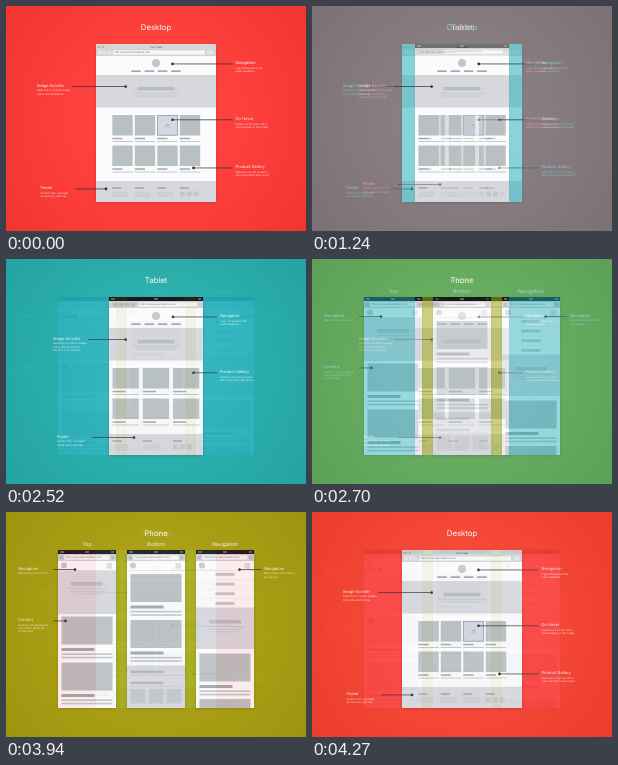
Recreate the animation shown at these times as an HTML page with a canvas. Size 300 px wide and 225 px high, loop 4300 ms.

```html
<!DOCTYPE html>
<html lang="en">
<head>
<meta charset="utf-8">
<title>Responsive wireframes</title>
<style>
html, body { margin: 0; width: 100%; height: 100%; overflow: hidden; }
canvas { display: block; width: 300px; height: 225px; }
</style>
</head>
<body>
<canvas id="stage" width="300" height="225"></canvas>
<script>
const W = 300, H = 225;
const PANEL = '#d7d8de', IMAGE = '#b9c0c3', DARK = '#a4a9ad', PALE = '#c3c7cb', INK = '#2c2c30';
const URL_TEXT = 'http://www.websitedemo.com';
let c;

function rect(x, y, w, h, color) {
  c.fillStyle = color;
  c.fillRect(x, y, w, h);
}

function circle(x, y, r, color) {
  c.fillStyle = color;
  c.beginPath();
  c.arc(x, y, r, 0, Math.PI * 2);
  c.fill();
}

function text(str, x, y, size, color = '#fff', align = 'left') {
  c.font = `${size}px Inter, sans-serif`;
  c.textRendering = 'geometricPrecision';
  c.textAlign = align;
  c.textBaseline = 'middle';
  c.fillStyle = color;
  c.fillText(str, x, y);
}

const centered = (x, y, w, h, color) => rect(x - w / 2, y, w, h, color);

function backdrop(inner, outer) {
  const g = c.createRadialGradient(150, 112, 50, 150, 112, 190);
  g.addColorStop(0, inner);
  g.addColorStop(1, outer);
  rect(0, 0, W, H, g);
}

// Label with a leader line towards a dot on the page
function note(x, y, title, lines, dotX) {
  text(title, x, y - 0.3, 4);
  lines.forEach((s, i) => text(s, x, y + 4.6 + i * 3.4, 2.55, 'rgba(255,255,255,.88)'));
  const lineX = dotX > x ? x + 35 : x - 3;
  rect(Math.min(lineX, dotX), y + 0.3, Math.abs(dotX - lineX), 0.7, INK);
  circle(dotX, y + 0.6, 1.3, INK);
}

function page(x, w) {
  c.save();
  c.shadowColor = 'rgba(0,0,0,.2)';
  c.shadowBlur = 3;
  c.shadowOffsetY = 0.5;
  rect(x, 38, w, 158, '#fbfbfc');
  c.restore();
}

function addressBar(x, w, fieldX, fieldW, y = 42) {
  rect(x, y, w, 7, '#d0d2d4');
  rect(fieldX, y + 1.3, fieldW, 4.4, '#f7f7f8');
  text(URL_TEXT, fieldX + 1.5, y + 3.6, 2.5, '#686c70');
}

function statusBar(x, w) {
  rect(x, 38, w, 4, '#17191b');
  rect(x + 2, 39.5, 4, 1, '#aaa');
  centered(x + w / 2, 39.5, 4, 1, '#aaa');
  rect(x + w - 5, 39.5, 3, 1, '#aaa');
}

function hero(x, y, w, h, barY, barW) {
  rect(x, y, w, h, PANEL);
  const mid = x + w / 2;
  centered(mid, barY, barW, 3.6, '#b9bdc3');
  centered(mid, barY + 6, barW * 1.25, 1, PALE);
  centered(mid, barY + 8.7, barW * 1.1, 1, PALE);
}

function pageTop(x, w) {
  circle(150, 57, 4, PALE);
  [130, 143.3, 156.6, 170].forEach(n => centered(n, 64.3, 9.5, 1.7, DARK));
  hero(x, 69, w, 32.5, 80.8, 37);
}

function pageFooter(x, w, columns) {
  rect(x, 175, w, 21, PANEL);
  columns.forEach((n, i) => {
    rect(n, 181.2, 9, 1.6, DARK);
    if (i < columns.length - 1) {
      for (let y = 185.7; y < 191; y += 2.1) rect(n, y, 16, 0.9, PALE);
    } else {
      for (let k = 0; k < 3; k++) rect(n + k * 7, 185.5, 5, 5, PALE);
    }
  });
}

function product(x, y, w, h) {
  rect(x, y, w, h, IMAGE);
  rect(x, y + h + 2.3, w * 0.5, 1.5, DARK);
  rect(x, y + h + 5.5, w, 1, PALE);
}

function desktop() {
  backdrop('#ff443f', '#f33430');
  text('Desktop', 150, 21.5, 7.8, '#fff', 'center');
  page(90, 120);
  rect(90, 38, 120, 5, '#d6d7d7');
  [92.5, 95, 97.5].forEach((x, i) => circle(x, 41, 0.8, ['#d8605a', '#d8b052', '#76af62'][i]));
  text('Your Page', 150, 41, 2.5, '#55595d', 'center');
  addressBar(90, 120, 107, 92, 43);
  [92, 96.7, 101.4].forEach(x => rect(x, 44.4, 3.9, 4.2, '#e3e4e5'));
  rect(201, 44.4, 7, 4.2, '#e3e4e5');
  pageTop(90, 120);
  const columns = [106.3, 128.8, 151.3, 173.8];
  for (const y of [109, 139.5]) columns.forEach(x => product(x, y, 20.4, 20.5));
  rect(151.3, 109, 20.4, 20.5, '#8d94a7');
  rect(152, 109.7, 19, 19.1, '#d4d8e3');
  centered(161.5, 118.4, 4, 0.8, '#8d94a7');
  centered(161.5, 120.6, 6, 0.8, '#b1b7c4');
  pageFooter(90, 120, columns);
  note(229.5, 57.3, 'Navigation', ['Logo sitting above the', 'main navigation'], 166.5);
  note(31, 80, 'Image Scroller', ['Selection of content images', 'with a title and full link'], 119.7);
  note(229.5, 113.2, 'On Hover', ['Fades to a tint color with a', 'quick overlay on the image'], 166.5);
  note(229.5, 161.3, 'Product Gallery', ['Selection of main products', 'with small title & description'], 187.5);
  note(34.5, 182.3, 'Footer', ['Contact info, copyright,', 'social icons, site map'], 100);
}

function tablet() {
  backdrop('#27b4be', '#18a4b0');
  text('Tablet', 150, 21.5, 7.8, '#fff', 'center');
  page(103, 94);
  statusBar(103, 94);
  addressBar(103, 94, 133, 58);
  [107, 113, 119, 125].forEach(x => rect(x, 43.8, 4.5, 3.6, '#b5b9bc'));
  pageTop(103, 94);
  const columns = [106.5, 136.8, 167];
  for (const y of [109, 139.5]) columns.forEach(x => product(x, y, 26.3, 20.5));
  pageFooter(103, 94, columns);
  note(214, 57.3, 'Navigation', ['Logo sitting above the', 'main navigation'], 167);
  note(47, 80, 'Image Scroller', ['Selection of content images', 'with a title and full link,', 'swipe to scroll through'], 119.7);
  note(214, 113.2, 'Product Gallery', ['Selection of main products', 'with small title & description'], 187.5);
  note(51, 178, 'Footer', ['Contact info, copyright,', 'social icons, site map'], 128);
}

function phone(x, name) {
  text(name, x + 29, 32, 5.2, '#fff', 'center');
  page(x, 58);
  statusBar(x, 58);
  addressBar(x, 58, x + 6.5, 45);
  rect(x + 1.5, 43.8, 3.5, 3.5, '#b5b9bc');
  rect(x + 53, 43.8, 3.5, 3.5, '#b5b9bc');
  circle(x + 6, 53.5, 3, PALE);
  for (let y = 51.3; y < 56; y += 2) rect(x + 48.5, y, 5.5, 1.1, PALE);
  rect(x, 58, 58, 0.6, '#dfe0e4');
}

function card(x, y) {
  rect(x + 3.5, y, 51, 28, IMAGE);
  rect(x + 3.5, y + 31.5, 33, 3, DARK);
  rect(x + 3.5, y + 36.8, 51, 1.7, PALE);
  rect(x + 3.5, y + 40.2, 51, 1.7, PALE);
}

function phones() {
  backdrop('#a8ad17', '#969d0b');
  text('Phone', 150, 21.5, 7.8, '#fff', 'center');

  phone(52, 'Top');
  hero(52, 58.6, 58, 43.4, 70, 32);
  centered(81, 81.4, 28, 1, PALE);
  card(52, 104.5);
  card(52, 150.5);

  phone(121, 'Bottom');
  card(121, 62);
  card(121, 108);
  rect(121, 153.5, 58, 42.5, PANEL);
  for (const y of [158.7, 169.7]) {
    rect(124.5, y, 33, 2.5, '#afb3b8');
    rect(124.5, y + 4, 51, 1, PALE);
  }
  [124.5, 142.5, 160.5].forEach(x => rect(x, 177, 15, 14.5, PALE));

  phone(190, 'Navigation');
  [61, 70.7, 80.3, 90].forEach(y => {
    centered(219, y, 19, 2.8, '#c4c7cd');
    rect(190, y + 6, 58, 0.5, '#e7e8eb');
  });
  hero(190, 95.5, 58, 41.5, 108, 32);
  centered(219, 119.4, 28, 1, PALE);
  card(190, 141.5);
  rect(193.5, 187, 51, 9, IMAGE);

  note(12, 57, 'Navigation', ['Responsive nav bar icon'], 69);
  note(12, 108.3, 'Content', ['Products are displayed in', 'one column below the', 'scroller area'], 59.5);
  note(258, 57, 'Navigation', ['Menu slides down, below', 'the logo bar'], 233.5);
}

const scenes = [desktop, tablet, phones].map(draw => {
  const layer = document.createElement('canvas');
  layer.width = W;
  layer.height = H;
  c = layer.getContext('2d');
  draw();
  return layer;
});

const LOOP = 4300, STEP = 30, STEPS = 13;
const fades = [1060, 2520, 3940];
const view = document.getElementById('stage').getContext('2d');
const start = performance.now();

function render() {
  const t = Math.max(0, performance.now() - start) % LOOP;
  const current = fades.filter(f => t >= f).length;
  view.globalAlpha = 1;
  view.drawImage(scenes[Math.max(0, current - 1)], 0, 0);
  if (current) {
    const step = Math.floor((t - fades[current - 1]) / STEP) + 1;
    view.globalAlpha = Math.min(1, step / STEPS);
    view.drawImage(scenes[current % 3], 0, 0);
  }
  requestAnimationFrame(render);
}
render();
</script>
</body>
</html>
```
